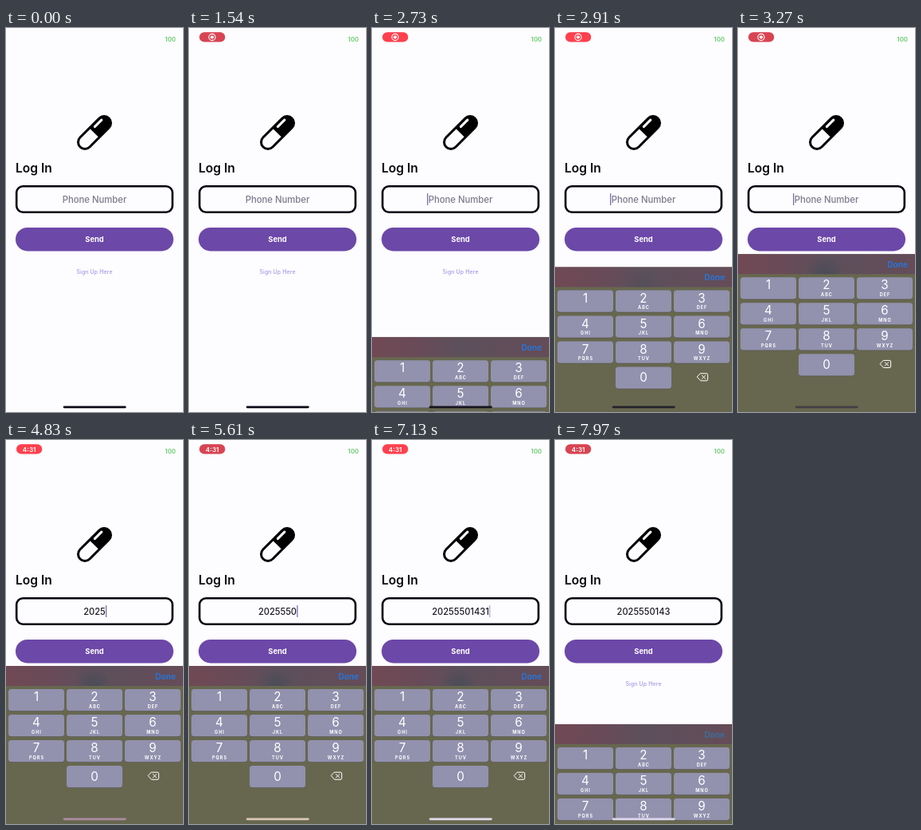
Recreate the animation shown at these times as an HTML page with a canvas. Size 222x481 px, loop 7.99 s.

```html
<!DOCTYPE html>
<html lang="en">
<head>
<meta charset="utf-8">
<title>Log In</title>
<style>
html, body { margin: 0; width: 100%; height: 100%; overflow: hidden; background: #fdfcff; }
canvas { display: block; width: 222px; height: 481px; }
</style>
</head>
<body>
<canvas id="stage"></canvas>
<script>
const W = 222, H = 481, LOOP = 7990;
const FONT = 'Inter, Roboto, sans-serif';
const KB_TOP = 283;
const FOCUS = 2600, SHOW = 2617, BLUR = 7840, HIDE = 7879;
const NUMBER = '20255501431';
const TYPED = [3850, 4100, 4450, 4700, 4950, 5200, 5480, 5750, 5980, 6190, 6400];
const ERASED = 7300;
const KEYS = ['1', '2 ABC', '3 DEF', '4 GHI', '5 JKL', '6 MNO', '7 PQRS', '8 TUV', '9 WXYZ'];

const canvas = document.getElementById('stage');
const ctx = canvas.getContext('2d');
const scale = window.devicePixelRatio || 1;
canvas.width = Math.round(W * scale);
canvas.height = Math.round(H * scale);

const clamp = x => Math.max(0, Math.min(1, x));
const smooth = (a, b, t) => { const x = clamp((t - a) / (b - a)); return x * x * (3 - 2 * x); };
const spring = ms => { const x = Math.max(0, ms) * 0.014; return 1 - (1 + x) * Math.exp(-x); };
const mix = (a, b, k) => 'rgb(' + a.map((v, i) => Math.round(v + (b[i] - v) * k)) + ')';

function box(x, y, w, h, r, fill) {
  ctx.beginPath();
  ctx.roundRect(x, y, w, h, r);
  if (fill) { ctx.fillStyle = fill; ctx.fill(); }
}

function stroke(color, width) {
  ctx.strokeStyle = color;
  ctx.lineWidth = width;
  ctx.stroke();
}

function line(points, color, width) {
  ctx.beginPath();
  points.forEach(([x, y]) => ctx.lineTo(x, y));
  stroke(color, width);
}

function text(str, x, y, size, weight, color, align = 'center', spacing = 0) {
  ctx.font = `${weight} ${size}px ${FONT}`;
  ctx.letterSpacing = spacing + 'px';
  ctx.textAlign = align;
  ctx.fillStyle = color;
  ctx.fillText(str, x, y);
  const width = ctx.measureText(str).width;
  ctx.letterSpacing = '0px';
  return width;
}

function drawCapsule() {
  ctx.save();
  ctx.translate(111, 131);
  ctx.rotate(-Math.PI / 4);
  box(-27, -10, 54, 20, 10, '#000');
  box(-24, -7, 23.5, 14, [7, 0, 0, 7], '#fdfcff');
  ctx.lineCap = 'round';
  line([[5.5, -5], [17.5, -5]], '#fdfcff', 3);
  ctx.restore();
}

function drawStatus(t) {
  text('100', 213, 16.8, 8, 500, '#58c95c', 'right');
  const alpha = smooth(250, 450, t);
  if (!alpha) return;
  const phase = t % 2000;
  const dim = phase < 1000 ? 1 - smooth(20, 190, phase) : smooth(1130, 1270, phase);
  ctx.globalAlpha = alpha;
  box(13, 5.2, 32.3, 12.4, 6.2, mix([255, 64, 78], [216, 68, 82], dim));
  if (t < 3650) {
    ctx.beginPath();
    ctx.arc(29, 11.5, 4.1, 0, 7);
    stroke('#fff', 1.1);
    ctx.beginPath();
    ctx.arc(29, 11.5, 2.1, 0, 7);
    ctx.fillStyle = '#fff';
    ctx.fill();
  } else {
    text('4:31', 29.2, 14.5, 8.2, 600, '#fff');
  }
  ctx.globalAlpha = 1;
}

function drawField(t) {
  box(13.2, 198.3, 195.6, 32.4, 8, '#fdfcff');
  stroke('#05040f', 2.6);

  const count = TYPED.filter(k => k <= t).length - (t >= ERASED ? 1 : 0);
  const width = count
    ? text(NUMBER.slice(0, count), 111, 218.6, 11.1, 500, '#1c1a22')
    : text('Phone Number', 111, 218.8, 11.3, 500, '#7d798c');

  if (t < FOCUS || t >= BLUR) return;
  const last = [FOCUS, ...TYPED, ERASED].filter(k => k <= t).pop();
  const age = (t - last) % 1000;
  ctx.globalAlpha = 1 - smooth(680, 800, age) + smooth(900, 1000, age);
  const x = count ? 111 + width / 2 + 0.2 : 69;
  box(x, 207, 1.3, 15, 0.6, '#7770b8');
  ctx.globalAlpha = 1;
}

function drawForm(t) {
  drawCapsule();
  text('Log In', 12, 180.6, 15.6, 600, '#08070c', 'left');
  drawField(t);
  box(12, 250, 198, 29.4, 14.7, '#6c48a8');
  text('Send', 111, 268.3, 9.4, 700, '#fff');
  text('Sign Up Here', 111, 307.8, 6.9, 500, '#a39be6', 'center', 0.15);
}

function drawKey(label, col, row) {
  const x = 3 + col * 73, y = 29 + row * 32;
  box(x, y + 0.8, 70, 27.2, 3.5, '#56564c');
  box(x, y, 70, 27.2, 3.5, '#9291ae');
  const [digit, letters] = label.split(' ');
  const mid = x + 35;
  text(digit, mid, y + (digit === '0' ? 18.6 : 15.2), 15.2, 400, '#fff');
  if (letters) text(letters, mid + 0.5, y + 23.6, 5.5, 700, '#fff', 'center', 1);
}

function drawBackspace() {
  ctx.lineJoin = 'round';
  ctx.lineCap = 'round';
  ctx.beginPath();
  ctx.moveTo(182.5, 133.2);
  ctx.lineTo(190, 133.2);
  ctx.quadraticCurveTo(191.6, 133.2, 191.6, 134.8);
  ctx.lineTo(191.6, 140.7);
  ctx.quadraticCurveTo(191.6, 142.3, 190, 142.3);
  ctx.lineTo(182.5, 142.3);
  ctx.lineTo(178.4, 137.8);
  ctx.closePath();
  stroke('#fff', 1);
  line([[184.3, 135.6], [188.7, 140]], '#fff', 1);
  line([[188.7, 135.6], [184.3, 140]], '#fff', 1);
}

function drawKeyboard(t) {
  const open = spring(t - SHOW) - spring(t - HIDE);
  if (open <= 0) return;
  ctx.save();
  ctx.translate(0, H - (H - KB_TOP) * open);
  box(0, 0, W, 210, 0, '#67674f');

  const bar = ctx.createLinearGradient(0, 0, W, 0);
  bar.addColorStop(0, '#704954');
  bar.addColorStop(0.28, '#684b58');
  bar.addColorStop(0.5, '#5c505b');
  bar.addColorStop(1, '#654c59');
  box(0, 0, W, 25, 0, bar);
  const settled = smooth(0.85, 1, open);
  if (settled) {
    const shade = ctx.createRadialGradient(109, 25, 4, 109, 25, 24);
    shade.addColorStop(0, 'rgba(75,76,88,.9)');
    shade.addColorStop(1, 'rgba(75,76,88,0)');
    ctx.globalAlpha = settled;
    box(85, 5, 48, 20, 0, shade);
    ctx.globalAlpha = 1;
  }
  text('Done', 213, 16.8, 10.2, 600, t > 7780 ? '#39719f' : '#2377e2', 'right');

  KEYS.forEach((key, i) => drawKey(key, i % 3, Math.floor(i / 3)));
  drawKey('0', 1, 3);
  drawBackspace();
  ctx.restore();
}

function drawHomeBar(t) {
  const stops = [
    [2600, [12, 10, 22]], [3270, [66, 64, 68]], [4210, [136, 92, 148]],
    [5610, [218, 200, 178]], [7130, [226, 220, 238]], [LOOP, [222, 216, 236]]
  ];
  let color = mix(stops[0][1], stops[0][1], 0);
  for (let i = 1; i < stops.length; i++) {
    const [a, from] = stops[i - 1], [b, to] = stops[i];
    if (t >= a) color = mix(from, to, clamp((t - a) / (b - a)));
  }
  box(71.7, 473.4, 79, 2.8, 1.4, color);
}

function draw(t) {
  ctx.setTransform(scale, 0, 0, scale, 0, 0);
  box(0, 0, W, H, 0, '#fdfcff');
  drawStatus(t);
  drawForm(t);
  drawKeyboard(t);
  drawHomeBar(t);
}

const start = performance.now();
function tick() {
  draw((performance.now() - start) % LOOP);
  requestAnimationFrame(tick);
}
tick();
</script>
</body>
</html>
```
